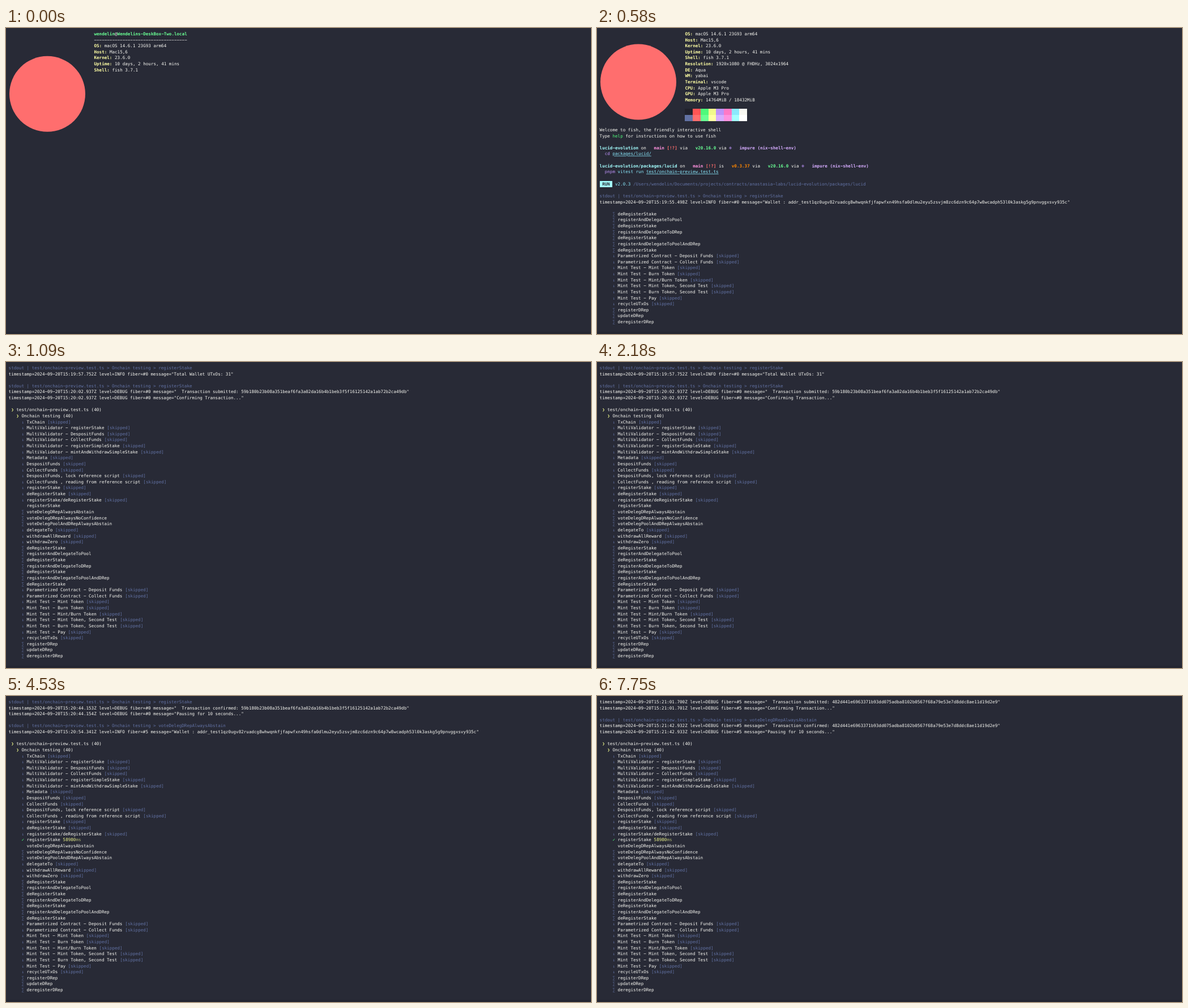
An HTML page for the animation above (8000 ms loop, 1033 by 542 pixels).

```html
<!DOCTYPE html>
<html lang="en">
<head>
<meta charset="utf-8">
<title>Terminal test run</title>
<style>
html, body { margin: 0; width: 100%; height: 100%; overflow: hidden; background: #282a36; }
svg { display: block; width: 1033px; height: 542px; }
rect { shape-rendering: crispEdges; }
text {
  font: 7.595px "DejaVu Sans Mono", "Liberation Mono", monospace;
  white-space: pre;
  text-rendering: geometricPrecision;
}
.w { fill: #f8f8f2; }
.d { fill: #6272a4; }
.g { fill: #50fa7b; }
.y { fill: #f1fa8c; }
.v { fill: #bd93f9; }
.c { fill: #8be9fd; }
.u { fill: #8be9fd; text-decoration: underline; }
.m { fill: #f1fa8c; fill-opacity: .65; }
.G, .Y, .R, .P, .V, .C, .O, .K { font-weight: bold; }
.G { fill: #69ff94; }
.Y { fill: #ffffa5; }
.R { fill: #ff6e6e; }
.P { fill: #ff92df; }
.V { fill: #d6acff; }
.C { fill: #a4ffff; }
.O { fill: #ff8700; }
.K { fill: #282a36; }
</style>
</head>
<body>
<svg viewBox="0 0 1033 542">
  <rect width="1033" height="542" fill="#282a36"/>
  <g id="screen"></g>
  <rect y="538" width="1033" height="4" fill="#242631"/>
</svg>
<script>
const LOOP = 8000, ROWS = 49;
const X0 = 4.6, Y0 = 5.2, CW = 4.572, RH = 10.627, BASE = 7.75;
const colX = c => X0 + c * CW;
const rowY = r => Y0 + r * RH;

// "^x" in a line switches to text style x.
const info = (key, value) => " ".repeat(33) + `^Y${key}:^w ${value}`;
const nixShell = "^G  v20.16.0^w via ^v❄   ^Vimpure (nix-shell-env)";

const intro = [
  " ".repeat(33) + "^Gwendelin^w@^GWendelins-DeskBox-Two.local",
  " ".repeat(33) + "-".repeat(36),
  info("OS", "macOS 14.6.1 23G93 arm64"),
  info("Host", "Mac15,6"),
  info("Kernel", "23.6.0"),
  info("Uptime", "10 days, 2 hours, 41 mins"),
  info("Shell", "fish 3.7.1"),
  info("Resolution", "1920x1080 @ FHDHz, 3024x1964"),
  info("DE", "Aqua"),
  info("WM", "yabai"),
  info("Terminal", "vscode"),
  info("CPU", "Apple M3 Pro"),
  info("GPU", "Apple M3 Pro"),
  info("Memory", "14764MiB / 18432MiB"),
  "", "", "", "",
  "Welcome to fish, the friendly interactive shell",
  "Type ^ghelp^w for instructions on how to use fish",
  "",
  "^Clucid-evolution^w on   ^Pmain ^R[!?]^w via " + nixShell,
  "  ^vcd ^upackages/lucid/",
  "",
  "^Clucid-evolution/packages/lucid^w on   ^Pmain ^R[!?]^w is   ^Ov0.3.37^w via " + nixShell,
  "  ^vpnpm ^cvitest run ^utest/onchain-preview.test.ts",
  "",
  "^K RUN ^c v2.0.3 ^d/Users/wendelin/Documents/projects/contracts/anastasia-labs/lucid-evolution/packages/lucid",
  ""
];
const RUN_LINE = 27, SWATCH_LINE = 15;

const output = (test, fiber, ...entries) => [
  `^dstdout | test/onchain-preview.test.ts > Onchain testing > ${test}`,
  ...entries.map(([time, level, msg]) =>
    `timestamp=2024-09-20T15:${time}Z level=${level} fiber=#${fiber} message="${msg}"`),
  ""
];
const wallet = "Wallet : addr_test1qz0ugv82ruadcg8whwqnkfjfapwfxn49hsfa0dlmu2eyu5zsvjm8zc6dzn9c64p7w8wcadph53l0k3askg5g9pnvggxsvy935c";

function testOutput(test, fiber, hash, times) {
  const [start, utxos, sent, waiting, done, pause] = times;
  return [
    ...output(test, fiber, [start, "INFO", wallet]),
    ...output(test, fiber, [utxos, "INFO", "Total Wallet UTxOs: 31"]),
    ...output(test, fiber, [sent, "DEBUG", "  Transaction submitted: " + hash],
      [waiting, "DEBUG", "Confirming Transaction..."]),
    ...output(test, fiber, [done, "DEBUG", "  Transaction confirmed: " + hash],
      [pause, "DEBUG", "Pausing for 10 seconds..."])
  ];
}

const log = [
  ...intro,
  ...testOutput("registerStake", 0,
    "59b180b23b08a351beaf6fa3a02da16b4b1beb3f5f16125142a1ab72b2ca49db",
    ["19:55.498", "19:57.752", "20:02.937", "20:02.937", "20:44.153", "20:44.154"]),
  ...testOutput("voteDelegDRepAlwaysAbstain", 5,
    "482d441e6963371b93dd075adba8102b0567f68a79e53e7d8ddc8ae11d19d2e9",
    ["20:54.341", "20:56.595", "21:01.700", "21:01.701", "21:42.932", "21:42.933"])
];

// A leading "-" marks a skipped test.
const tests = `-TxChain
-MultiValidator - registerStake
-MultiValidator - DespositFunds
-MultiValidator - CollectFunds
-MultiValidator - registerSimpleStake
-MultiValidator - mintAndWithdrawSimpleStake
-Metadata
-DespositFunds
-CollectFunds
-DespositFunds, lock reference script
-CollectFunds , reading from reference script
-registerStake
-deRegisterStake
-registerStake/deRegisterStake
registerStake
voteDelegDRepAlwaysAbstain
voteDelegDRepAlwaysNoConfidence
voteDelegPoolAndDRepAlwaysAbstain
-delegateTo
-withdrawAllReward
-withdrawZero
deRegisterStake
registerAndDelegateToPool
deRegisterStake
registerAndDelegateToDRep
deRegisterStake
registerAndDelegateToPoolAndDRep
deRegisterStake
-Parametrized Contract - Deposit Funds
-Parametrized Contract - Collect Funds
-Mint Test - Mint Token
-Mint Test - Burn Token
-Mint Test - Mint/Burn Token
-Mint Test - Mint Token, Second Test
-Mint Test - Burn Token, Second Test
-Mint Test - Pay
-recycleUTxOs
registerDRep
updateDRep
deregisterDRep`.split("\n");
const FIRST_TEST = 14, TAIL = 19, FULL = tests.length + 2;

function testLine(name, i, running) {
  if (name[0] === "-") return `     ^d↓ ^w${name.slice(1)} ^d[skipped]`;
  if (i === running) return "       " + name;
  if (i < running) return `     ^g✓ ^w${name} ^y58980^mms`;
  return `     ^d∑ ^w${name}`;
}
const testList = running => [
  " ^y❯ ^wtest/onchain-preview.test.ts (40)",
  "   ^y❯ ^wOnchain testing (40)",
  ...tests.map((name, i) => testLine(name, i, running))
];

// [start ms, log lines, list lines, finished tests, list tail erased]
const steps = [
  [0, 7], [40, 8], [90, 11], [140, 14], [190, 17], [240, 20],
  [300, 22], [350, 23], [400, 25], [460, 26], [520, 29],
  [580, 32, TAIL], [750, 35, TAIL], [920, 35, FULL], [1090, 39, FULL],
  [2150, 39, FULL, 0, true], [2180, 39, FULL], [3810, 43, FULL],
  [4490, 43, FULL, 1], [4520, 46, FULL, 1], [4660, 49, FULL, 1],
  [5000, 53, FULL, 1], [7750, 57, FULL, 1]
];

const rect = (col, row, cols, fill) =>
  `<rect x="${colX(col)}" y="${rowY(row)}" width="${cols * CW}" height="${RH}" fill="${fill}"/>`;

// The terminal face has wide hyphens, close to a minus sign.
const glyphs = text => text.trim().replace(/-/g, "−").replace(/>/g, "&gt;");

function drawLine(line, row) {
  let col = 0, svg = "";
  for (const part of ("^w" + line).split("^").slice(1)) {
    const style = part[0], text = part.slice(1);
    const lead = text.length - text.trimStart().length;
    if (text.trim())
      svg += `<text class="${style}" x="${colX(col + lead)}" y="${rowY(row) + BASE}">${glyphs(text)}</text>`;
    col += text.length;
  }
  return svg;
}

const swatches = [
  "#21222c #ff5555 #50fa7b #f1fa8c #bd93f9 #ff79c6 #8be9fd #f8f8f2",
  "#6272a4 #ff6e6e #69ff94 #ffffa5 #d6acff #ff92df #a4ffff #ffffff"
].map(s => s.split(" "));

function drawScreen([, count, listed = 0, finished = 0, erased]) {
  const list = listed ? testList(FIRST_TEST + finished).slice(-listed) : [];
  const lines = [...log.slice(0, count), ...list];
  const shift = Math.max(0, lines.length - ROWS);
  const visible = lines.slice(shift, erased ? -TAIL : undefined);
  let svg = "";
  if (shift < 17) {
    svg += `<circle cx="73" cy="${rowY(10.5 - shift)}" r="67" fill="#ff6e6e"/>`;
    if (count > SWATCH_LINE + 1)
      swatches.forEach((colors, r) => colors.forEach((fill, i) => {
        svg += rect(33 + i * 3, SWATCH_LINE + r - shift, 3, fill);
      }));
    if (count > RUN_LINE) svg += rect(0, RUN_LINE - shift, 5, "#a4ffff");
    if (count === intro.length) svg += rect(0, count, 1, "#f8f8f2");
  }
  return svg + visible.map(drawLine).join("");
}

const screenNode = document.getElementById("screen");
const origin = performance.now();
let shown;

function update(now) {
  const t = Math.max(0, now - origin) % LOOP;
  const step = steps.findLast(s => s[0] <= t);
  if (step !== shown) {
    screenNode.innerHTML = drawScreen(step);
    shown = step;
  }
  requestAnimationFrame(update);
}
update(origin);
</script>
</body>
</html>
```
